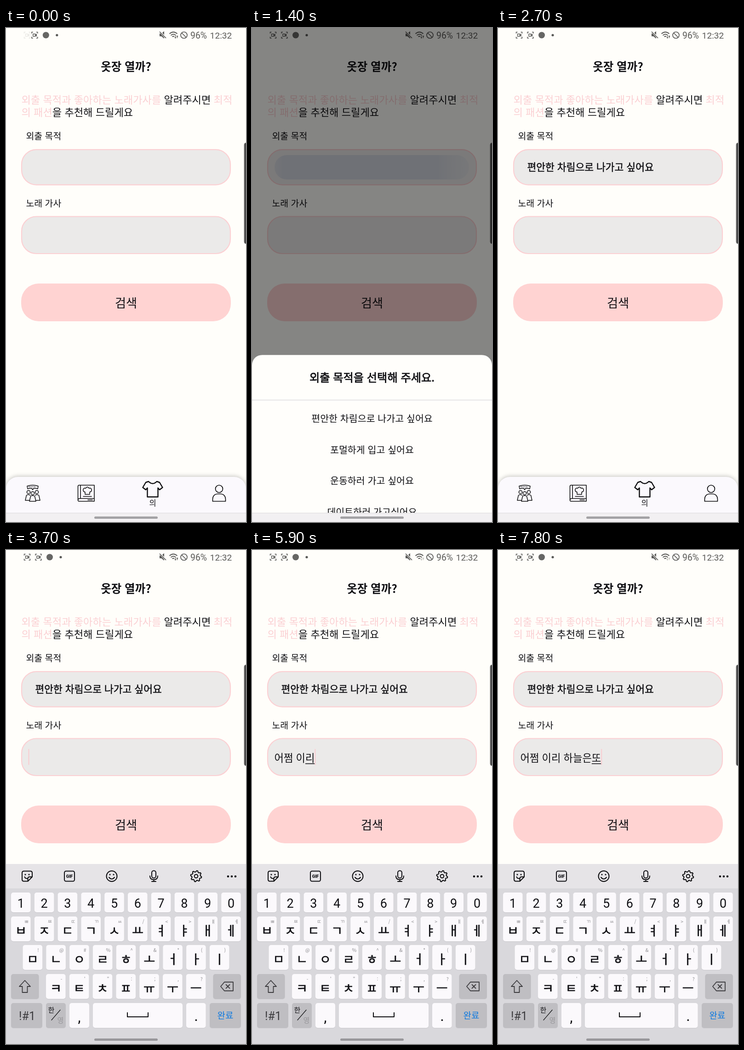
An HTML page for the animation above (8 s loop, 522 by 1073 pixels).

```html
<!DOCTYPE html>
<html lang="ko">
<head>
<meta charset="utf-8">
<style>
html, body { margin: 0; width: 100%; height: 100%; overflow: hidden; background: #fffefa; }
svg { display: block; width: 100%; height: 100%; }
text { font-family: "Noto Sans CJK KR", "Noto Sans CJK", "Noto Sans KR", sans-serif; white-space: pre; }
.r { font-family: Roboto, sans-serif; }
.m { stroke: #101014; stroke-width: .5; }
.l { fill: none; stroke: #0c0c0e; stroke-linecap: round; stroke-linejoin: round; }
.s { fill: none; stroke: #5a5a58; stroke-width: 1.7; }
</style>
</head>
<body>
<svg id="stage" viewBox="0 0 522 1073"></svg>
<script>
const INK = '#101014', PINK = '#fbd0d3', SOFT = '#3c3b3e';
const rect = (x, y, w, h, r, fill, more = '') =>
  `<rect x="${x}" y="${y}" width="${w}" height="${h}" rx="${r}" fill="${fill}" ${more}/>`;
const path = (d, width, more = '') => `<path class="l" d="${d}" stroke-width="${width}" ${more}/>`;
const circle = (x, y, r, more) => `<circle cx="${x}" cy="${y}" r="${r}" ${more}/>`;
// text placed by the vertical middle of its glyphs
const text = (x, y, size, str, more = '') =>
  `<text x="${x}" y="${y + size * .38}" font-size="${size}" fill="${INK}" ${more}>${str}</text>`;
const mid = (x, y, size, str, more = '') => text(x, y, size, str, 'text-anchor="middle" ' + more);
const roman = (x, y, size, str, more = '') => mid(x, y, size, str, 'class="r" ' + more);
const group = (id, body) => `<g id="${id}">${body}</g>`;

/* ---------- status bar ---------- */
const capture = x => `<g transform="translate(${x} 15.5)"><path class="s" style="stroke-width:1.4"
  d="M-6.500 -3.500V-6.500H-3.500M3.500 -6.500H6.500V-3.500M6.500 3.500V6.500H3.500M-3.500 6.500H-6.500V3.500M-3.500 -2.500H1.500V2.500H-3.500ZM1.500 0L4 -2V2Z"/></g>`;
const statusBar = () =>
  group('fresh', capture(46)) +
  group('notices', capture(70.5) + circle(95, 15.5, 7, 'fill="#666664"') +
    circle(119, 15.5, 2.6, 'fill="#5a5a58"')) +
  `<path d="M334 12H338L344 7V23L338 18H334Z" fill="#5a5a58"/>
   <path d="M334 7L348 22" stroke="#fffefa" stroke-width="4"/><path class="s" d="M334 8L348 22"/>
   <path class="s" d="M355.500 12.500Q364 5 372.500 12.500M358.500 16Q364 11 369.500 16M361.500 19Q364 17 366 19"/>
   <path id="traffic" class="s" style="stroke-width:1.2" d="M368.500 17V22M367 20.500L368.500 22L370 20.500M372.500 22V17M371 18.500L372.500 17L374 18.500"/>
   <circle class="s" cx="387" cy="15.500" r="7"/><path class="s" d="M382 10.500L392 20.500"/>` +
  roman(419, 15.5, 19.4, '96%', 'style="fill:#5a5a58"') +
  roman(467.5, 15.5, 19.2, '12:32', 'style="fill:#5a5a58"');

/* ---------- form ---------- */
const pink = s => `<tspan fill="${PINK}">${s}</tspan>`;
const field = (y, h) => rect(34, y, 454, h, 32, '#ebeae9', `stroke="${PINK}" stroke-width="2.2"`);
const form = () =>
  mid(261, 84, 24.5, '옷장 열까?', 'font-weight="700"') +
  text(33.5, 156, 22.15, pink('외출 목적과 좋아하는 노래가사를') + ' 알려주시면 ' + pink('최적')) +
  text(33.5, 183, 22.15, pink('의 패션') + '을 추천해 드릴게요') +
  text(43.5, 235, 19.4, '외출 목적') + text(43.5, 381, 19.4, '노래 가사') +
  field(264.2, 76.4) + field(409.5, 80.5) +
  rect(49, 276, 423, 53, 26.5, 'url(#tap)', 'id="ripple"') +
  text(63.5, 302, 21.5, '편안한 차림으로 나가고 싶어요', 'id="purpose" class="m"') +
  text(48.5, 452, 22.2, '', 'id="lyric"') +
  rect(0, 463.5, 20.4, 1.5, 0, INK, 'id="under"') +
  rect(0, 432, 2, 35, 1, '#f9cdd1', 'id="caret"') +
  rect(33, 555, 456, 82, 38, '#ffd3d2') + mid(261, 597, 26.2, '검색') +
  rect(518, 249.5, 10, 219, 4, '#4c4c4c', 'stroke="#8a8a88"');

/* ---------- bottom tabs ---------- */
const head = (x, y) => circle(x, y, 3.6, 'class="l" stroke-width="1.5"');
const tabs = () =>
  rect(0, 975, 522, 120, 26, '#fbf9fd', 'style="filter:drop-shadow(0 -2px 4px #0003)"') +
  path('M46 995Q58 991 70 995L69 1001Q64 999 60 1000L58 1003L56 1000Q52 999 47 1001Z', 1.5) +
  path('M50 996.500H66', 1.6, 'stroke-dasharray="1 3"') +
  head(49, 1008) + head(67, 1008) + head(58, 1010.5) +
  path('M51 1028L53.500 1017Q58 1014 62.500 1017L65 1028ZM50 1026H42L44.500 1015Q49 1012 52.500 1015M66 1026H74L71.500 1015Q67 1012 63.500 1015', 1.5) +
  path('M159 993H192V1028H159Q156.500 1028 156.500 1025V996Q156.500 993 159 993ZM162 993V1022M157 1024Q158 1022 160 1022H192M178 1025H188', 1.6) +
  path('M172 1013V1008Q167 1007 168 1002Q170 998 173 1000Q177 994 181 1000Q184 998 186 1002Q187 1007 182 1008V1013ZM168 1017.500H186', 1.5) +
  path('M310 985Q319 994 328 985L334 987L340.500 998L334 1003L330.500 999V1018.500H307.500V999L304 1003L297.500 998L304 987Z', 2.4) +
  mid(319, 1032, 16.5, '의') +
  circle(463.5, 1001, 8, 'class="l" stroke-width="1.7"') +
  path('M449.500 1028V1023Q450 1013 460 1012H467Q477 1013 477.500 1023V1028Z', 1.7);

/* ---------- option sheet ---------- */
const options = ['편안한 차림으로 나가고 싶어요', '포멀하게 입고 싶어요', '운동하러 가고 싶어요', '데이트하러 가고싶어요'];
const sheet = () =>
  rect(0, 698.5, 522, 440, 22, '#fffefb') +
  mid(261, 747, 24.2, '외출 목적을 선택해 주세요.', 'class="m" style="stroke-width:.8"') +
  rect(0, 795.5, 522, 2, 0, '#e5e4e6') +
  rect(0, 804, 522, 67, 0, '#e9e8e6', 'id="picked"') +
  options.map((s, i) => mid(261, 837 + i * 67.4, 20.6, s)).join('');

const systemBar = () =>
  rect(0, 1053, 522, 20, 0, '#f2f0f2') + rect(0, 1053, 522, 1, 0, '#dcdadd') +
  rect(192, 1061, 138, 5, 2.5, '#a3a2a5');

/* ---------- keyboard ---------- */
const LIGHT = '#fbf9fc', DARK = '#bfbec2', STEP = 50.8;
const PLAIN = 'ㅂㅈㄷㄱㅅㅛㅕㅑㅐㅔ', SHIFTED = 'ㅃㅉㄸㄲㅆㅛㅕㅑㅒㅖ';
const key = (x, y, w, h, id, fill = LIGHT) =>
  rect(x, y + 1, w, h, 5, '#c9c8cc') + rect(x, y, w, h, 5, fill, `data-key="${id}"`);
const row = (x, y, chars, hints) => [...chars].map((c, i) => {
  const left = x + i * STEP;
  return key(left, y, 42.6, 54, c) +
    mid(left + 21.3, y + 30.5, 27, c, 'class="jamo m" style="stroke-width:.7"') +
    mid(left + 33.5, y + 11.5, 10.5, hints[i], 'style="fill:#8d8c90"');
}).join('');
const gear = Array.from({ length: 32 }, (_, i) => {
  const a = (i + .5) * Math.PI / 16, r = i % 4 < 2 ? 12 : 9.3;
  return [413.5 + r * Math.cos(a), 708.5 + r * Math.sin(a)].map(n => n.toFixed(1));
}).join(' ');
const toolbar = () =>
  path('M46 719.500H39Q35 719.500 35 715.500V701.500Q35 697.500 39 697.500H53Q57 697.500 57 701.500V710L47.500 719.500V714Q47.500 710 51 710H57M40.500 710Q42 714 46 713.500', 2) +
  circle(42, 705, 1.6, `fill="${INK}"`) + circle(50, 705, 1.6, `fill="${INK}"`) +
  rect(127, 697.5, 22, 22, 3.5, 'none', `stroke="${INK}" stroke-width="2"`) +
  roman(138, 708.2, 9.5, 'GIF', 'font-weight="900"') +
  circle(230, 708.5, 11.5, 'class="l" stroke-width="2"') + path('M224 711Q230 718 236 711', 2) +
  circle(226, 705, 1.6, `fill="${INK}"`) + circle(234, 705, 1.6, `fill="${INK}"`) +
  rect(317, 696.5, 9, 16, 4.5, 'none', `stroke="${INK}" stroke-width="2"`) +
  path('M313 708Q313 716 321.500 716T330 708M321.500 716V720M317 720H326', 2) +
  `<polygon class="l" points="${gear}" stroke-width="2"/>` + circle(413.5, 708.5, 3.8, 'class="l" stroke-width="2"') +
  [483, 491, 499].map(x => circle(x, 709, 2.3, `fill="${INK}"`)).join('');
const keyboard = () =>
  rect(0, 682, 522, 391, 0, '#d9d8dc') + rect(0, 682, 522, 53, 0, '#e6e4e7') + toolbar() +
  [...'1234567890'].map((c, i) => key(11 + i * STEP, 744, 42.6, 43, c) + roman(32.3 + i * STEP, 766.5, 27, c)).join('') +
  row(11, 796, PLAIN, [...'ㅃㅉㄸㄲㅆ/', '&lt;', '&gt;', 'ㅒ', 'ㅖ']) +
  row(36.5, 858, 'ㅁㄴㅇㄹㅎㅗㅓㅏㅣ', ['!', '@', '#', '%', '^', '&amp;', '*', '(', ')']) +
  row(87, 921, 'ㅋㅌㅊㅍㅠㅜㅡ', ['-', "'", '"', ':', ';', ',', '?']) +
  key(11, 921, 60.5, 54, 'shift', DARK) +
  path('M41 935L53 948H46.500V961H35.500V948H29Z', 1.8, `id="arrow" style="stroke:${SOFT}"`) +
  key(450.5, 921, 60.5, 54, 'back', DARK) +
  path('M475 938.500H494V957.500H475L467 948ZM478.500 944L486.500 952M486.500 944L478.500 952', 1.8, `style="stroke:${SOFT}"`) +
  key(11, 984, 68, 54, 'sym', DARK) + roman(46, 1011, 25, '!#1', `style="fill:${SOFT}"`) +
  key(87, 984, 43, 54, 'lang', DARK) + mid(98.5, 999, 15, '한') +
  mid(118.5, 1021, 15, '영', 'style="fill:#97969a"') + path('M99 1021L118 999', 1.2) +
  key(138, 984, 43, 54, ',') + roman(159.5, 1015, 27, ',', 'font-weight="500"') +
  key(189, 984, 195, 54, ' ') + path('M264 1005V1014H309V1005', 2) +
  key(392, 984, 42.6, 54, '.') + roman(413.5, 1013, 27, '.', 'font-weight="500"') +
  key(443, 984, 68, 54, 'done', DARK) + mid(477, 1011, 19, '완료', 'style="fill:#0a78e0"') +
  rect(192, 1061, 138, 5, 2.5, '#98979b');

const stage = document.getElementById('stage');
stage.innerHTML =
  `<defs><linearGradient id="tap"><stop offset="0" stop-color="#dcdee4"/><stop offset=".04" stop-color="#d5d8e2"/>
   <stop offset=".84" stop-color="#d5d8e2"/><stop offset=".9" stop-color="#dcdee4"/><stop offset="1" stop-color="#e4e5e8"/></linearGradient></defs>` +
  rect(0, 0, 522, 1073, 0, '#fffefa') + statusBar() + form() + tabs() +
  rect(0, 0, 522, 1073, 0, '#000', 'id="dim"') +
  group('sheet', sheet()) + systemBar() + group('keyboard', keyboard());

/* ---------- motion ---------- */
const $ = id => document.getElementById(id);
const put = (el, attrs) => { for (const k in attrs) el.setAttribute(k, attrs[k]); };
const clamp = v => Math.min(1, Math.max(0, v));
const easeOut = u => 1 - (1 - clamp(u)) ** 3;
const show = (id, on) => put($(id), { opacity: +on });

// [time, text after the key, key]
const typing = [
  [3300, ''], [4200, 'ㅇ', 'ㅇ'], [4400, '어', 'ㅓ'], [4700, '어', 'shift'], [5100, '어ㅉ', 'ㅈ'],
  [5200, '어쩌', 'ㅓ'], [5400, '어쩜', 'ㅁ'], [5500, '어쩜 ', ' '], [5600, '어쩜 ㅇ', 'ㅇ'],
  [5700, '어쩜 이', 'ㅣ'], [5800, '어쩜 일', 'ㄹ'], [5900, '어쩜 이리', 'ㅣ'], [6100, '어쩜 이리 ', ' '],
  [6200, '어쩜 이리 ㅎ', 'ㅎ'], [6300, '어쩜 이리 하', 'ㅏ'], [6400, '어쩜 이리 한', 'ㄴ'],
  [6500, '어쩜 이리 하느', 'ㅡ'], [6700, '어쩜 이리 하늘', 'ㄹ'], [6800, '어쩜 이리 하늘ㅇ', 'ㅇ'],
  [6900, '어쩜 이리 하늘으', 'ㅡ'], [7100, '어쩜 이리 하늘은', 'ㄴ'], [7300, '어쩜 이리 하늘은', 'shift'],
  [7600, '어쩜 이리 하늘은ㄸ', 'ㄷ'], [7700, '어쩜 이리 하늘은또', 'ㅗ']
];
const keys = [...stage.querySelectorAll('[data-key]')].map(el => ({ el, id: el.dataset.key, fill: el.getAttribute('fill') }));
const topRow = [...stage.querySelectorAll('.jamo')].slice(0, PLAIN.length);

function drawTyping(t) {
  const last = typing.filter(e => e[0] <= t).pop();
  const str = last ? last[1] : '';
  $('lyric').textContent = str;
  const end = 48.5 + (str ? $('lyric').getComputedTextLength() : 0);
  put($('under'), { x: end - 20.4, opacity: +(str !== '' && !str.endsWith(' ')) });
  put($('caret'), { x: end, opacity: +(!!last && (t - last[0]) % 1000 < 500) });

  const pressed = typing.find(e => t >= e[0] - 100 && t < e[0]);
  for (const k of keys) put(k.el, { fill: pressed && pressed[2] === k.id ? (k.fill === DARK ? '#a9a8ac' : '#cccbd0') : k.fill });
  const shift = !!last && last[2] === 'shift';
  topRow.forEach((el, i) => el.textContent = (shift ? SHIFTED : PLAIN)[i]);
  $('arrow').style.fill = shift ? SOFT : 'none';
}

function draw(t) {
  put($('fresh'), { opacity: 1 - .88 * Math.exp(-t / 90) });
  put($('notices'), { transform: `translate(${-8.2 * Math.exp(-t / 90)})` });
  put($('traffic'), { opacity: t < 5000 ? 1 : .4 });

  const open = t < 2500 ? easeOut((t - 1230) / 250) : 1 - clamp((t - 2500) / 200);
  put($('sheet'), { transform: `translate(0 ${356 * (1 - open)})` });
  put($('dim'), { opacity: .495 * open });
  put($('ripple'), { opacity: t < 1300 ? 0 : clamp((1600 - t) / 200) });
  show('picked', t === 2400);
  show('purpose', t >= 2500);

  const rise = easeOut((t - 3300) / 300);
  put($('keyboard'), { transform: `translate(0 ${391 * (1 - rise)})` });
  drawTyping(t);
}

function tick() {
  // the screen advances ten times a second
  draw(Math.floor(performance.now() % 8000 / 100) * 100);
  requestAnimationFrame(tick);
}
tick();
</script>
</body>
</html>
```
